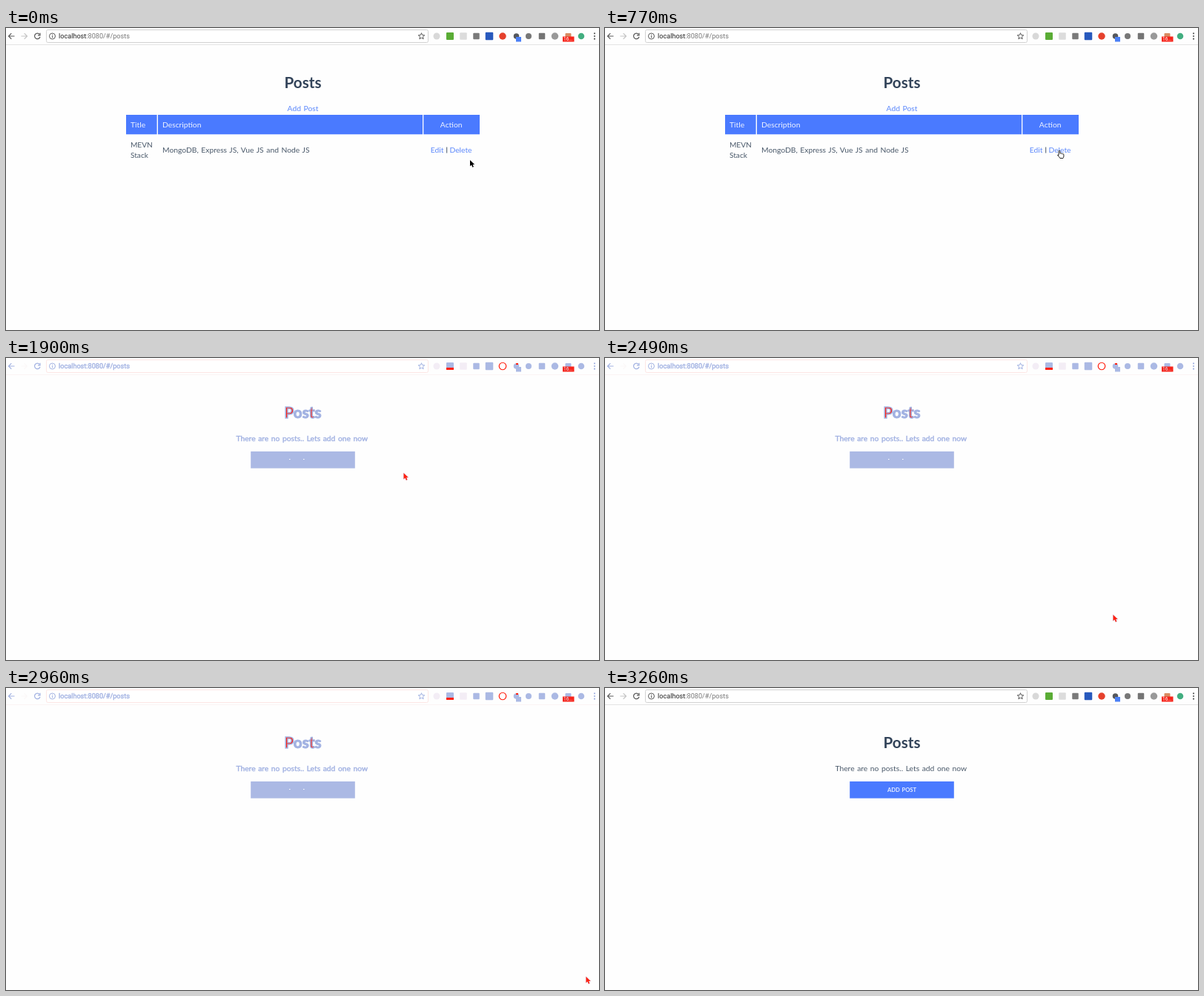
These frames come from a looping animation (800 by 407 pixels, 3.41 s). An HTML page:

```html
<!DOCTYPE html>
<html lang="en">
<head>
<meta charset="utf-8">
<title>Posts</title>
<style>
html, body { margin: 0; width: 100%; height: 100%; overflow: hidden; background: #fefefe; }
svg { display: block; width: 100%; height: 100%; }
text { font: 10.3px Lato, sans-serif; word-spacing: .95px; fill: #4a596a; }
.mid { text-anchor: middle; }
.link { fill: #5c88fb; }
.head text { fill: #f0f4ff; }
.small { font-size: 10.1px; }
.blue { fill: #4a7aff; }
text.title { font-size: 20.6px; font-weight: 700; fill: #33445a; }
text.button { font-size: 7.6px; font-weight: 700; fill: #e6edff; }
text.url { font: 9.15px Roboto, sans-serif; fill: #777; }
.url .host { fill: #222; }
text.badge { font: 6.5px Roboto, sans-serif; fill: #fff; }
.line { fill: none; stroke: #5a5a5a; stroke-width: 1.2; }
.thin { stroke-width: 1; }
.box { fill: #fff; stroke: #d2d2d2; }
.rule { fill: #e4e4e4; }
.arrow { fill: #000; stroke: #fff; stroke-width: .7; paint-order: stroke; }
.hand { fill: #fff; stroke: #111; stroke-width: .9; stroke-linejoin: round; }
.washOnly { display: none; }

/* reduced two-tone palette */
.wash .washOnly { display: inline; }
.wash text, .wash .url .host { fill: #a2b2e2; stroke: #a2b2e2; stroke-width: .4; }
.wash text.title { stroke-width: 1; }
.wash .title .hot { fill: #ff2010; stroke-width: 1.5; }
.wash text.button { display: none; }
.wash text.badge { fill: #dfe4f7; stroke: none; }
.wash .blue, .wash .icon { fill: #abb9e4; }
.wash .icon.pale { fill: #f3edf5; }
.wash .icon.ring { fill: #fff; stroke: #ff2010; stroke-width: 1.2; }
.wash .line { stroke: #a2b2e2; }
.wash .line.dim { stroke: #f6eeee; }
.wash .box { stroke: #fde6e4; }
.wash .rule { fill: #fbf4f4; }
.wash .dots { fill: #a2b2e2; }
.wash .arrow { fill: #ff2010; stroke: #c9cfec; }
</style>
</head>
<body>
<svg id="stage" viewBox="0 0 800 407" preserveAspectRatio="none">
  <rect width="800" height="407" fill="#fefefe"/>
  <rect class="rule" y="22" width="800" height="1"/>
  <rect class="box" x="54.5" y="2.5" width="515" height="17" rx="2"/>
  <path class="line" d="M11.5 11H3.8M7.3 7.2L3.5 11L7.3 14.8"/>
  <path class="line dim" stroke-opacity=".35" d="M20.5 11H28.2M24.7 7.2L28.5 11L24.7 14.8"/>
  <path class="line" d="M45.3 8.5A3.8 3.8 0 1 0 46 12"/>
  <path class="line" d="M46 6.8V9.8H43"/>
  <circle class="line thin" cx="62.5" cy="11" r="4"/>
  <path class="line thin" d="M62.5 10.3V13.3M62.5 8.5V9.5"/>
  <text class="url" x="71" y="14.2"><tspan class="host">localhost</tspan>:8080/#/posts</text>
  <path id="star" class="line thin"/>
  <g id="icons"></g>
  <g class="washOnly" fill="#ff2010">
    <rect x="594" y="13" width="10" height="3"/>
    <rect x="688" y="7" width="3" height="2"/>
  </g>
  <rect class="icon" x="688" y="12" width="7" height="6.5" fill="#4b80f5"/>
  <rect x="751" y="11.5" width="15.5" height="7" fill="#f7251b"/>
  <text class="badge" x="752" y="17.4">16...</text>
  <g class="dots" fill="#5a5a5a">
    <circle cx="794" cy="7.3" r="1.1"/><circle cx="794" cy="11" r="1.1"/><circle cx="794" cy="14.7" r="1.1"/>
  </g>

  <text class="title mid" x="400.5" y="81"><tspan class="hot">P</tspan>os<tspan class="hot">t</tspan>s</text>

  <g id="list">
    <text class="link mid" x="400.5" y="112">Add Post</text>
    <g class="head">
      <rect class="blue" x="162" y="117" width="41.6" height="26.3"/>
      <rect class="blue" x="205" y="117" width="357" height="26.3"/>
      <rect class="blue" x="563.3" y="117" width="75.7" height="26.3"/>
      <text x="168" y="133.5">Title</text>
      <text x="211" y="133.5">Description</text>
      <text class="mid" x="600.7" y="133.5">Action</text>
    </g>
    <text class="small" x="168" y="161.3">MEVN</text>
    <text class="small" x="168" y="175.3">Stack</text>
    <text x="211" y="168.3">MongoDB, Express JS, Vue JS and Node JS</text>
    <text class="link" x="572.7" y="168.3">Edit</text>
    <rect x="594.2" y="160.5" width="1" height="8" fill="#4a596a"/>
    <text class="link" x="598.4" y="168.3">Delete</text>
  </g>

  <g id="empty">
    <text class="mid" x="399.3" y="112">There are no posts.. Lets add one now</text>
    <rect class="blue" x="330.2" y="125.9" width="140.6" height="22.7"/>
    <text class="button mid" x="400.5" y="139.9">ADD POST</text>
    <path class="washOnly" fill="#fff" d="M382 136h1.5v1h-1.5zM401 136h1.5v1h-1.5z"/>
  </g>

  <path id="arrow" class="arrow" d="M0 0V8.3L2 6.5L3.4 9.7L4.9 9.1L3.6 6H6.2Z"/>
  <path id="hand" class="hand" d="M1.3 6.6V1.4Q1.3 .4 2.2 .4T3.1 1.4V4.2Q4.2 3.4 5 4.5Q6.1 3.9 6.6 5Q8 4.5 8.1 6V8.2Q8 9.5 7.2 10.7H3.1Q2.4 9.1 .2 7.3Q-.8 5.5 1.3 6.6Z"/>
</svg>
<script>
const LOOP = 3410;
const $ = id => document.getElementById(id);

// extension buttons: shape, centre x, size, colour, washed style
const icons = [
  ["circle", 581, 9, "#d8d8d8", "pale"],
  ["rect", 599, 10, "#5aac35", ""],
  ["rect", 617, 9.5, "#dcdcdc", "pale"],
  ["rect", 634.5, 8.5, "#7a7a7a", ""],
  ["rect", 652, 10.5, "#2859bd", ""],
  ["circle", 670, 9.5, "#e5402c", "ring"],
  ["circle", 688.5, 7.5, "#55585c", ""],
  ["circle", 705, 8, "#777", ""],
  ["rect", 723, 8.5, "#747474", ""],
  ["circle", 740.5, 9.5, "#999", ""],
  ["rect", 758.5, 8, "#d98b62", ""],
  ["circle", 776, 8.5, "#42ae80", ""]
];
$("icons").innerHTML = icons.map(([shape, x, size, fill, style]) => {
  const r = size / 2;
  const geometry = shape === "circle"
    ? `cx="${x}" cy="11" r="${r}"`
    : `x="${x - r}" y="${11 - r}" width="${size}" height="${size}" rx="1"`;
  return `<${shape} class="icon ${style}" ${geometry} fill="${fill}"/>`;
}).join("");

const points = Array.from({ length: 10 }, (_, i) => {
  const a = i * Math.PI / 5, r = i % 2 ? 2 : 4.5;
  return `${560.5 + r * Math.sin(a)} ${11.2 - r * Math.cos(a)}`;
});
$("star").setAttribute("d", `M${points.join("L")}Z`);

// start time, pointer kind, x, y
const pointer = [
  [0, "arrow", 626, 178],
  [450, "arrow", 624, 177],
  [620, "arrow", 619, 174],
  [770, "hand", 610.8, 164.8],
  [1300, "arrow", 613.5, 165],
  [1900, "arrow", 536.5, 155],
  [2050, "arrow", 502.5, 151],
  [2200, "arrow", 508, 158],
  [2340, "arrow", 679.5, 341],
  [2490, "arrow", 685.5, 346],
  [2660, "none", 0, 0],
  [2960, "arrow", 782.5, 389],
  [3110, "none", 0, 0]
];

const show = (id, on) => { $(id).style.display = on ? "" : "none"; };
const within = (t, a, b) => t >= a && t < b;

function draw(t) {
  const deleted = t >= 1300;
  show("list", !deleted);
  show("empty", deleted);
  $("stage").classList.toggle("wash", within(t, 1300, 2660) || within(t, 2960, 3260));

  const [, kind, x, y] = pointer.filter(p => p[0] <= t).pop();
  for (const id of ["arrow", "hand"]) {
    show(id, id === kind);
    $(id).setAttribute("transform", `translate(${x} ${y})`);
  }
}

const start = performance.now();
function tick() {
  draw((performance.now() - start) % LOOP);
  requestAnimationFrame(tick);
}
tick();
</script>
</body>
</html>
```
